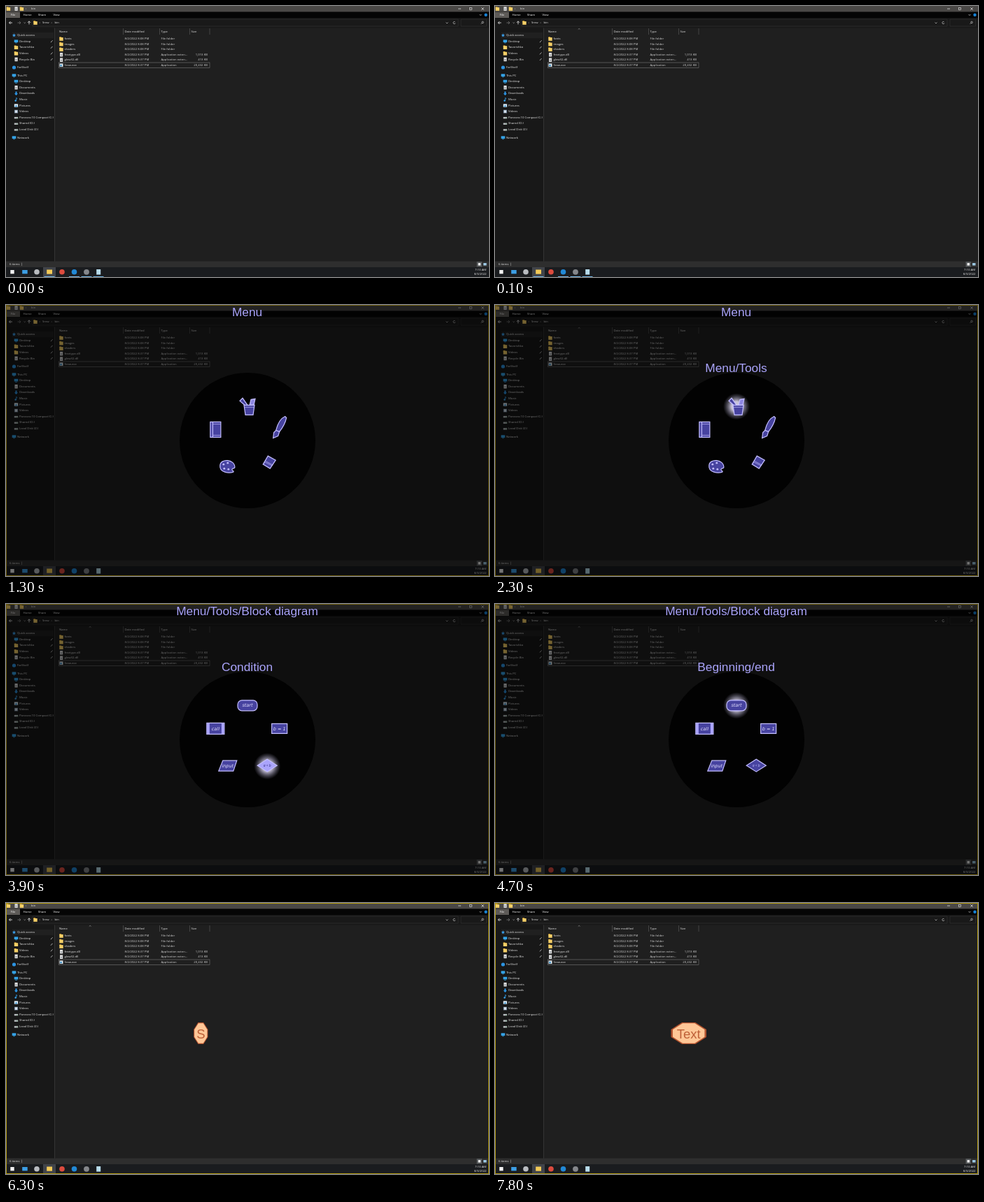
An HTML page with a canvas for the animation above (8 s loop, 690 by 388 pixels).

```html
<!DOCTYPE html>
<html lang="en">
<head>
<meta charset="utf-8">
<title>Radial menu</title>
<style>
html, body { margin: 0; width: 100%; height: 100%; overflow: hidden; background: #000; }
canvas { display: block; width: 690px; height: 388px; }
</style>
</head>
<body>
<canvas id="stage" width="690" height="388"></canvas>
<script>
const ctx = document.getElementById('stage').getContext('2d');
const W = 690, H = 388, LOOP = 8000;
const UI = '"Open Sans", "Noto Sans", sans-serif';
const SANS = '"Liberation Sans", Arial, sans-serif';
const LILAC = '#aaa4fb', PALE = '#c3beff', INDIGO = '#4743a0';

function rect(x, y, w, h, color) {
  ctx.fillStyle = color;
  ctx.fillRect(x, y, w, h);
}
function frame(x, y, w, h, color, line = 0.6) {
  ctx.strokeStyle = color;
  ctx.lineWidth = line;
  ctx.strokeRect(x, y, w, h);
}
function disc(x, y, r, color) {
  ctx.fillStyle = color;
  ctx.beginPath();
  ctx.arc(x, y, r, 0, Math.PI * 2);
  ctx.fill();
}
function path(points, fill, stroke, line = 1, close = true) {
  ctx.beginPath();
  points.forEach(([x, y]) => ctx.lineTo(x, y));
  if (close) ctx.closePath();
  if (fill) { ctx.fillStyle = fill; ctx.fill(); }
  if (stroke) { ctx.strokeStyle = stroke; ctx.lineWidth = line; ctx.stroke(); }
}
const line = (points, color, width = 0.7) => path(points, null, color, width, false);
function text(s, x, y, { size = 4.25, color = '#e8e8e8', align = 'left', font = UI, base = 'middle', style = '' } = {}) {
  ctx.font = `${style} ${size}px ${font}`;
  ctx.textAlign = align;
  ctx.textBaseline = base;
  ctx.fillStyle = color;
  ctx.fillText(s, x, y);
}

// File window
function folder(x, y) {
  rect(x - 2.7, y - 2.8, 2.8, 2, '#d9a62c');
  rect(x - 2.7, y - 2, 5.4, 4.8, '#f5cf67');
}
function page(x, y) {
  rect(x - 2, y - 2.8, 4.2, 5.6, '#dcdcdc');
  disc(x, y + 0.5, 1, '#8a9299');
}
function monitor(x, y, color = '#35a4e8') {
  rect(x - 2.8, y - 2.2, 5.6, 3.6, color);
  rect(x - 1.5, y + 1.9, 3, 0.7, color);
}
function star(x, y) {
  const pts = Array.from({ length: 10 }, (_, i) => {
    const a = i * Math.PI / 5 - Math.PI / 2, r = i % 2 ? 1.2 : 2.8;
    return [x + r * Math.cos(a), y + r * Math.sin(a)];
  });
  path(pts, '#3aa0ee');
}
function drive(x, y) {
  rect(x - 2.7, y - 0.8, 5.4, 2.4, '#b9bcc0');
  rect(x + 0.8, y + 0.3, 1.1, 0.6, '#33b04a');
}
function download(x, y) {
  path([[x - 1, y - 2.7], [x + 1, y - 2.7], [x + 1, y], [x + 2.6, y], [x, y + 2.7], [x - 2.6, y], [x - 1, y]], '#2f9cf0');
}
function note(x, y) {
  disc(x - 0.8, y + 1.6, 1.2, '#36a6f2');
  line([[x + 0.2, y + 1.6], [x + 0.2, y - 2.4], [x + 1.8, y - 1.2]], '#36a6f2', 0.8);
}
function picture(x, y) {
  rect(x - 2.7, y - 2.2, 5.4, 4.4, '#dbe8f2');
  path([[x - 2.2, y + 1.7], [x, y - 0.8], [x + 2.2, y + 1.7]], '#3b93cf');
}
function film(x, y) {
  rect(x - 2.6, y - 2.3, 5.2, 4.6, '#7b8fa5');
  rect(x - 1.4, y - 1.8, 2.8, 3.6, '#dce6ee');
}
const ball = (x, y) => disc(x, y, 2.6, '#2c94e2');

const SIDE = [
  [42, 0, 'Quick access', star],
  [50.6, 1, 'Desktop', monitor, 1], [59.2, 1, 'Tavorishko', folder, 1],
  [67.8, 1, 'Videos', folder, 1], [76.4, 1, 'Recycle Bin', page, 1],
  [88, 0, 'FarShelf', ball], [99.5, 0, 'This PC', monitor],
  [108, 1, 'Desktop', monitor], [116.7, 1, 'Documents', page],
  [125.3, 1, 'Downloads', download], [133.9, 1, 'Music', note],
  [142.5, 1, 'Pictures', picture], [151.1, 1, 'Videos', film],
  [159.7, 1, 'Paneora 10 Compact (C:)', drive], [168.3, 1, 'Shared (D:)', drive],
  [177, 1, 'Local Disk (Z:)', drive], [188.5, 0, 'Network', monitor]
];
const FILES = [
  ['fonts', '8:08 PM', 'File folder', ''], ['images', '8:08 PM', 'File folder', ''],
  ['shaders', '8:08 PM', 'File folder', ''],
  ['freetype.dll', '8:37 PM', 'Application exten...', '1,013 KB'],
  ['glew32.dll', '8:37 PM', 'Application exten...', '413 KB'],
  ['Srew.exe', '8:37 PM', 'Application', '20,432 KB']
];

function drawChrome() {
  rect(0, 0, W, 8.5, '#4a4846');
  rect(0, 8.5, W, 9, '#050505');
  rect(0, 8.5, 20, 8.5, '#5d5a57');
  rect(0, 17.5, W, 14, '#191919');
  folder(3.5, 4); page(14.5, 4); folder(22.5, 4);
  text('›', 28, 4); text('bin', 36, 4);
  line([[646, 4], [650, 4]], '#eee');
  frame(662.5, 2.5, 3, 3, '#eee');
  line([[679.3, 2.3], [682.7, 5.7]], '#eee');
  line([[682.7, 2.3], [679.3, 5.7]], '#eee');
  ['File', 'Home', 'Share', 'View'].forEach((s, i) =>
    text(s, [10, 30.5, 51.5, 72][i], 12.8, { align: 'center', color: '#fff' }));
  line([[676.5, 12], [678, 13.5], [679.5, 12]], '#ddd');
  disc(685.5, 12.7, 2.2, '#1683d8');

  line([[9, 24], [4.5, 24]], '#eee', 0.8);
  line([[6.5, 22], [4.5, 24], [6.5, 26]], '#eee', 0.8);
  line([[16.5, 24], [21, 24]], '#777', 0.8);
  line([[19, 22], [21, 24], [19, 26]], '#777', 0.8);
  line([[25.5, 23.5], [26.7, 24.7], [27.9, 23.5]], '#aaa');
  line([[33, 26.3], [33, 21.8]], '#eee', 0.8);
  line([[31, 23.8], [33, 21.8], [35, 23.8]], '#eee', 0.8);
  frame(38, 19, 608, 10, '#343434');
  frame(650, 19, 36.5, 10, '#343434');
  folder(42, 24);
  text('›', 47.5, 24); text('Srew', 52, 24); text('›', 64.5, 24); text('bin', 69.5, 24);
  line([[628.5, 23.5], [630, 25], [631.5, 23.5]], '#ccc');
  ctx.beginPath(); ctx.arc(640.5, 24, 1.6, 0.3, 5.4); ctx.stroke();
  ctx.beginPath(); ctx.arc(681, 23.4, 1.3, 0, 7); ctx.stroke();
  line([[680, 24.4], [678.6, 25.8]], '#ccc');
}

function drawFiles() {
  rect(0, 31.5, 69, 334.5, '#181818');
  rect(9, 37.8, 59, 8.4, '#202020');
  rect(69, 31.5, 0.8, 334.5, '#3a3a3a');
  SIDE.forEach(([y, depth, name, icon, pinned]) => {
    icon(depth ? 14.5 : 11.5, y);
    ctx.save();
    ctx.beginPath(); ctx.rect(0, y - 4, 69, 8); ctx.clip();
    text(name, depth ? 19 : 16, y);
    ctx.restore();
    if (pinned) line([[64, y + 1.5], [65.3, y], [66.5, y - 1.3]], '#bbb', 1);
  });

  [167.5, 219.5, 262.5, 291].forEach(x => line([[x, 32], [x, 41]], '#555'));
  ['Name', 'Date modified', 'Type', 'Size'].forEach((s, i) => text(s, [76, 169.5, 221.5, 264.5][i], 36.8));
  line([[118.8, 33.5], [120.2, 32.3], [121.6, 33.5]], '#aaa', 0.6);
  FILES.forEach(([name, time, type, size], i) => {
    const y = 47 + i * 7.55;
    if (i < 3) folder(79, y);
    else if (i < 5) page(79, y);
    else { rect(76.5, y - 2.3, 5, 4.6, '#e6edf2'); rect(77.3, y - 0.8, 2.5, 2.4, '#3688be'); }
    text(name, 83.5, y);
    text('8/2/2022 ' + time, 169.5, y, { color: '#d6d6d6' });
    text(type, 221.5, y, { color: '#d6d6d6' });
    text(size, 288, y, { color: '#d6d6d6', align: 'right' });
  });
  frame(75.5, 81, 215.5, 7.4, '#777');
}

function drawTaskbar() {
  rect(0, 365.5, W, 8.5, '#2e2e2e');
  text('6 items', 5, 370);
  line([[22.5, 367.5], [22.5, 372]], '#aaa', 0.5);
  rect(672.5, 366, 7.5, 7.5, '#55585a');
  rect(674.5, 368, 3.5, 3.5, '#eee');
  rect(682, 368, 4.5, 3.5, '#9cc7e2');
  rect(0, 374, W, 14, '#1a1c1f');
  rect(53, 374, 18, 14, '#41444a');
  rect(6.3, 378, 5.4, 5.4, '#f2f2f2');
  rect(23.2, 378, 7.5, 5.4, '#3c9ee4');
  disc(44, 380.8, 3.8, '#b9bcc0');
  rect(58.2, 377.5, 7.8, 6.2, '#f4cb57');
  disc(80, 380.8, 3.8, '#dc4b3e');
  disc(97.5, 380.8, 3.8, '#2289d6');
  disc(115, 380.8, 3.9, '#85878b');
  rect(129.2, 377, 6, 7.6, '#b8dcec');
  [62, 97.5, 115, 132].forEach(x => rect(x - 7.5, 387, 15, 1, '#75b8e8'));
  text('7:10 AM', 686, 378, { align: 'right' });
  text('8/3/2022', 686.5, 384.3, { align: 'right' });
}

function drawDesktop() {
  rect(0, 0, W, H, '#1f1f1f');
  drawChrome();
  drawFiles();
  drawTaskbar();
}

function drawSpotlight() {
  ctx.save();
  ctx.translate(243, 168);
  ctx.scale(16 / 9, 1);
  const g = ctx.createRadialGradient(0, 0, 0, 0, 0, 102);
  [[0, 0], [0.45, 0.05], [0.7, 0.3], [0.88, 0.62], [1, 0.84]].forEach(([p, a]) =>
    g.addColorStop(p, `rgba(0,0,0,${a})`));
  ctx.fillStyle = g;
  ctx.fillRect(-W, -H, W * 2, H * 2);
  ctx.restore();
}

// Menu icons, each drawn around its own centre
const ink = (pts, fill = INDIGO, width = 1.2) => path(pts, fill, PALE, width);
const box = (w, h, fill) => ink([[-w, -h], [w, -h], [w, h], [-w, h]], fill);
const script = (s, y = 0.5, color = '#e4e1ff') =>
  text(s, 0, y, { size: 6.5, align: 'center', font: '"DejaVu Sans", sans-serif', style: 'italic', color });

function toolPot() {
  ink([[-3, -1], [-11, -8], [-7, -12], [0, -2]]);
  ink([[3, -2], [5, -10], [11, -11], [9, -2]], '#8e87e2');
  ink([[-5, -2], [10, -2], [8, 12], [-3, 12]]);
  line([[-5, 1], [10, 1]], PALE);
}
function brush() {
  ctx.beginPath();
  ctx.moveTo(8, -19);
  ctx.quadraticCurveTo(-1, -15, -5, 1);
  ctx.lineTo(0, 3);
  ctx.quadraticCurveTo(8, -7, 10, -17);
  ctx.closePath();
  ctx.fillStyle = INDIGO; ctx.fill();
  ctx.strokeStyle = PALE; ctx.lineWidth = 1.2; ctx.stroke();
  ink([[-5, 1], [0, 3], [-2, 9], [-9, 12], [-8, 4]]);
}
function eraser() {
  ctx.translate(3, -7);
  ink([[-2, -9], [9, -3], [1, 9], [-9, 3]]);
  line([[-6, -2], [5, 4]], PALE);
  line([[-9, 3], [-6, 0], [4, 5]], PALE);
}
function palette() {
  ctx.beginPath();
  ctx.moveTo(10, 1);
  ctx.bezierCurveTo(11, -12, -11, -13, -11, -2);
  ctx.bezierCurveTo(-12, 8, 2, 9, 8, 7);
  ctx.bezierCurveTo(10, 5, 1, 4, 10, 1);
  ctx.fillStyle = INDIGO; ctx.fill();
  ctx.strokeStyle = PALE; ctx.lineWidth = 1.2; ctx.stroke();
  [[-6, -4], [0, -6], [-5, 2], [1, 3]].forEach(([x, y]) => disc(x, y, 1.4, PALE));
}
function sheet() {
  box(7.5, 11);
  line([[-4, -11], [-4, 11]], PALE, 1.2);
  line([[-4, -8], [7, -8]], PALE);
  line([[-4, 8], [7, 8]], PALE);
}
function blocks() {
  ink([[-5, -10], [5, -10], [5, -4], [-5, -4]]);
  line([[0, -4], [0, 1]], PALE);
  ink([[0, 0], [9, 5], [0, 10], [-9, 5]]);
}
function start() {
  ctx.beginPath();
  ctx.roundRect(-14, -7.5, 28, 15, 6);
  ctx.fillStyle = INDIGO; ctx.fill();
  ctx.strokeStyle = PALE; ctx.lineWidth = 1.2; ctx.stroke();
  script('start');
}
function call() {
  box(12.5, 8);
  rect(-12.5, -8, 4, 16, LILAC);
  rect(8.5, -8, 4, 16, LILAC);
  script('call');
}
function decision(hot) {
  ink([[-14, -1], [0, -10], [14, -1], [0, 8]], hot ? LILAC : INDIGO);
  text('a < b', 0, -0.5, { size: 5, align: 'center', style: 'italic', color: hot ? '#302c82' : PALE });
}
const MENUS = {
  'Menu': [toolPot, brush, eraser, palette, sheet],
  'Menu/Tools': [
    () => ink([[0, -10], [10, 8], [-10, 8]]),
    () => box(10, 7),
    blocks,
    () => ink([[-10, 8], [-7, 1], [6, -9], [10, -5], [-3, 6]]),
    () => ink([[-9, 0], [-4, -8], [5, -8], [10, 0], [5, 8], [-4, 8]])
  ],
  'Menu/Tools/Block diagram': [
    start,
    () => { box(11, 7); script('b = 1'); },
    decision,
    () => { ink([[-7, -8], [13, -8], [8, 7], [-13, 7]]); script('input'); },
    call
  ]
};

// time, menu, hovered slot, label
const STEPS = [
  [1200, 'Menu', -1, ''],
  [1500, 'Menu', 0, 'Menu/Tools'],
  [2100, 'Menu', 2, 'Eraser'],
  [2200, 'Menu', -1, ''],
  [2300, 'Menu', 0, 'Menu/Tools'],
  [3000, 'Menu/Tools', 0, 'Menu/Tools/Geometry'],
  [3200, 'Menu/Tools', -1, ''],
  [3300, 'Menu/Tools', 2, 'Menu/Tools/Block diagram'],
  [3700, 'Menu/Tools/Block diagram', 2, 'Condition'],
  [4000, 'Menu/Tools/Block diagram', 3, 'Input/output'],
  [4200, 'Menu/Tools/Block diagram', 4, 'Subroutine'],
  [4500, 'Menu/Tools/Block diagram', 2, 'Condition'],
  [4700, 'Menu/Tools/Block diagram', 0, 'Beginning/end']
];
const latest = (steps, t) => steps.filter(s => s[0] <= t).pop();

function drawMenu(t) {
  const [, title, hover, label] = latest(STEPS, t);
  ctx.save();
  ctx.globalAlpha = t < 1300 ? 0.5 : 1;
  rect(0, 0, W, H, 'rgba(0,0,0,0.52)');
  disc(345, 194, 97, '#020202');
  const caption = { size: 17.3, color: LILAC, align: 'center', font: SANS, base: 'alphabetic' };
  text(title, 344.5, 16.3, caption);
  text(label, 344.5, 96, caption);
  MENUS[title].forEach((icon, i) => {
    const a = i * Math.PI * 0.4 - Math.PI / 2;
    ctx.save();
    ctx.translate(345 + 48 * Math.cos(a), 193.3 + 48 * Math.sin(a));
    if (i === hover) {
      const g = ctx.createRadialGradient(0, 0, 7, 0, 0, 19);
      g.addColorStop(0, 'rgba(235,230,255,0.85)');
      g.addColorStop(0.5, 'rgba(200,195,225,0.4)');
      g.addColorStop(1, 'rgba(160,155,190,0)');
      disc(0, 0, 19, g);
    }
    icon(i === hover);
    ctx.restore();
  });
  ctx.restore();
}

const TYPED = [[5100, 'Text'], [6300, 'S'], [6500, 'St'], [6700, 'Sta'], [7000, 'Star'], [7600, 'S'], [7800, 'Text']];

function octagon(w, h, color) {
  const x = w / 2, y = h / 2, tx = x * 0.38, sy = y * 0.36;
  path([[-x, -sy], [-tx, -y], [tx, -y], [x, -sy], [x, sy], [tx, y], [-tx, y], [-x, sy]], color);
}
function drawBlock(t) {
  const k = Math.min(1, Math.floor((t - 5100) / 100) / 4);
  const word = latest(TYPED, t)[1];
  ctx.save();
  ctx.translate(376 - 99.3 * k, 225.5 - 39 * k);
  if (word !== 'Text') ctx.translate(1.6, 0);
  ctx.font = `18.5px ${SANS}`;
  const w = ctx.measureText(word).width * 1.4 + 3;
  octagon(w, 31, '#b3532f');
  octagon(w * 0.9, 28.6, '#ffc797');
  text(word, 0, 7.6, { size: 18.5, color: '#bd6038', align: 'center', font: SANS, base: 'alphabetic' });
  ctx.restore();
}

function draw(now) {
  const t = now % LOOP;
  drawDesktop();
  if (t >= 700 && t < 1200) drawSpotlight();
  else if (t >= 1200 && t < 5100) drawMenu(t);
  else if (t >= 5100) drawBlock(t);
  if (t >= 700) frame(0.5, 0.5, W - 1, H - 1, t < 1200 ? '#3a3500' : t < 5100 ? '#6b5b10' : '#b39b14', 1);
  requestAnimationFrame(draw);
}
requestAnimationFrame(draw);
</script>
</body>
</html>
```
